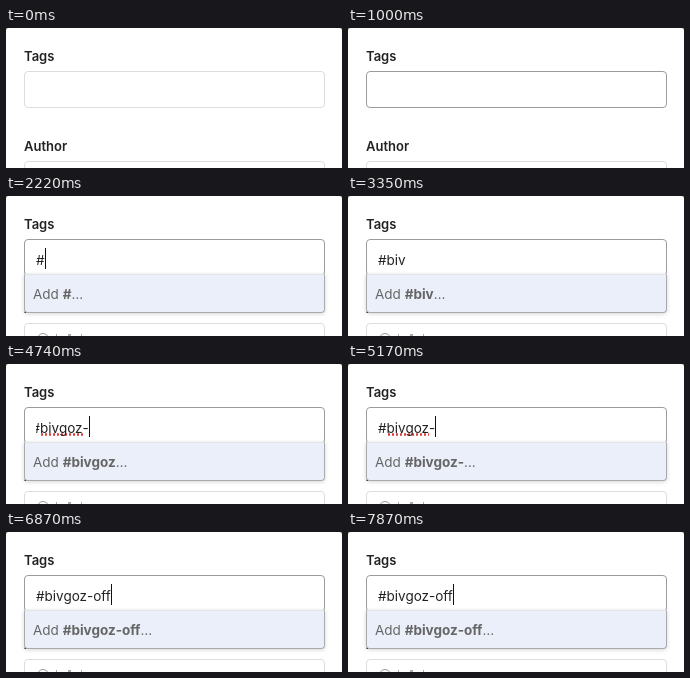
Animation, 336 px wide and 140 px high, one loop 8000 ms. Source, as an HTML page:

```html
<!DOCTYPE html>
<html lang="en">
<head>
<meta charset="utf-8">
<title>Tag field</title>
<style>
  html, body { margin: 0; width: 100%; height: 100%; overflow: hidden; background: #777; }
  #stage {
    position: relative; width: 336px; height: 140px; overflow: hidden;
    background: #fff; border-radius: 3px 3px 0 0;
    font: 13.5px/20px Inter, "Open Sans", sans-serif; color: #222;
  }
  #stage div, #caret { position: absolute; box-sizing: border-box; white-space: pre; }
  .label { left: 18px; font-size: 13px; font-weight: 600; }
  .field { left: 18px; width: 301px; height: 37px; border: 1px solid #ddd; border-radius: 4px; background: #fff; }
  #author { left: 0; top: 0; }
  #entry { left: 30px; top: 52px; width: 276px; height: 25px; overflow: hidden; }
  #line { left: 0; top: 2px; }
  #caret { left: 100%; top: -2px; width: 1px; height: 21px; background: #111; }
  .empty #caret { height: 23px; }
  .misspelt #word {
    background: radial-gradient(circle, #d9413a 1px, transparent 1.5px) 0 100% / 4px 3px repeat-x;
  }
  #menu {
    left: 18px; top: 78px; width: 301px; height: 39px;
    border: 1px solid #aaa; border-top-color: #e2e4e8; border-radius: 0 0 4px 4px;
    background: #eaeffa; color: #666; box-shadow: 0 1px 4px rgba(0, 0, 0, .17);
  }
  #menu div { left: 8px; top: 9px; }
  #menu b { font-weight: 700; }
  .avatar { left: 31px; top: 137px; width: 12px; height: 12px; border: 1px solid #999; border-radius: 50%; }
  .tip { top: 138px; height: 2px; background: #aaa; }
</style>
</head>
<body>
<div id="stage">
  <div class="label" style="top:18px">Tags</div>
  <div class="field" id="tags" style="top:43px"></div>
  <div id="entry"><div id="line"><span id="hash"></span><span id="word"></span><span id="rest"></span><i id="caret"></i></div></div>
  <div id="author">
    <div class="label" style="top:108px">Author</div>
    <div class="field" style="top:133px"></div>
    <div style="top:6px;left:0">
      <div class="avatar"></div>
      <div class="tip" style="left:50px;width:1px"></div>
      <div class="tip" style="left:62px;width:3px"></div>
      <div class="tip" style="left:75px;width:1px"></div>
    </div>
  </div>
  <div id="menu"><div>Add <b id="pick"></b>…</div></div>
</div>
<script>
  const LOOP = 8000, TAG = '#bivgoz-off';
  const $ = id => document.getElementById(id);

  // Each key shows in the field first, then in the menu.
  const keys = [2170, 2430, 2700, 2860, 3910, 4080, 4250, 4740, 5400, 5690, 5910];
  const lag = 50;
  const blinks = [480, 1000, 1480, 2000, 2170, 3350, 3830, 5250, 5400, 6390, 6870, 7390, 7870];

  const passed = (times, t) => times.filter(x => x <= t).length;

  function draw(t) {
    const typed = TAG.slice(0, passed(keys, t));
    const picked = TAG.slice(0, passed(keys, t - lag));
    const focus = Math.min(1, Math.max(0, (t - 430) / 220));
    const grey = Math.round(221 - 66 * focus);

    $('tags').style.borderColor = `rgb(${grey},${grey},${grey})`;
    $('hash').textContent = typed.slice(0, 1);
    $('word').textContent = typed.slice(1, 7);
    $('rest').textContent = typed.slice(7);
    $('pick').textContent = picked;

    $('entry').className = typed ? (t >= 4740 && t < 5570 ? 'misspelt' : '') : 'empty';
    // The field scrolls briefly before it grows for the hyphen.
    $('line').style.left = (t >= 4740 && t < 4740 + lag ? -4.5 : 0) + 'px';
    $('caret').style.visibility = passed(blinks, t) % 2 ? 'visible' : 'hidden';
    $('menu').style.visibility = picked ? 'visible' : 'hidden';
    $('author').style.top = (typed ? -6 : 0) + 'px';
    // The second row's contents sit just below the edge until it moves up.
  }

  function tick() {
    draw(performance.now() % LOOP);
    requestAnimationFrame(tick);
  }
  tick();
</script>
</body>
</html>
```
